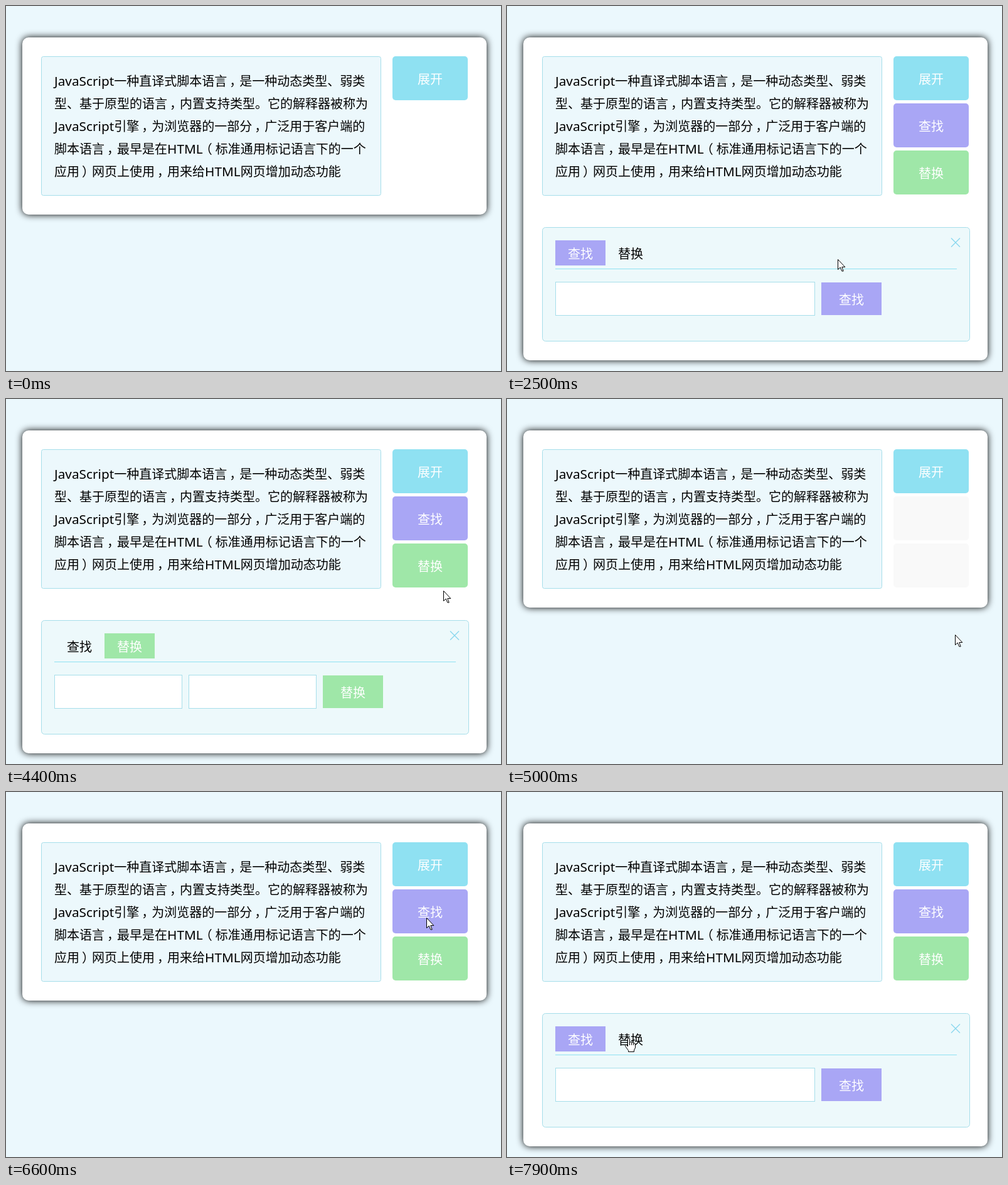
An HTML page that plays this animation: 789x581 px, repeating every 8 s.

```html
<!DOCTYPE html>
<html lang="zh-CN">
<head>
<meta charset="utf-8">
<title>展开 查找 替换</title>
<style>
  html, body { margin: 0; width: 100%; height: 100%; overflow: hidden; background: #ebf8fd; }
  #card { position: absolute; left: 26px; top: 50px; width: 740px;
    border-radius: 10px; background: #fff; box-shadow: 0 0 12px #000; }
  svg { position: absolute; left: 0; top: 0; }
  text { font: 20px "Noto Sans CJK SC", "Noto Sans CJK", "Noto Sans CJK JP", sans-serif; white-space: pre; }
  .latin { font: 20.8px "Noto Sans", "Open Sans", sans-serif; }
</style>
</head>
<body>
<div id="card"></div>
<svg id="stage" width="789" height="581" viewBox="0 0 789 581"></svg>
<script>
const NS = 'http://www.w3.org/2000/svg';
const BLUE = '#8fe1f2', PURPLE = '#a9a6f5', GREEN = '#9fe7a8', EDGE = '#a6deea';
const FIND = '查找', REPLACE = '替换';
const LOOP = 8000, STEP = 100;
const stage = document.getElementById('stage');
const card = document.getElementById('card');

function add(parent, tag, attrs = {}) {
  const el = document.createElementNS(NS, tag);
  for (const k in attrs) el.setAttribute(k, attrs[k]);
  parent.appendChild(el);
  return el;
}
const group = parent => add(parent, 'g');
const show = (el, on) => el.setAttribute('display', on ? 'inline' : 'none');
const fillBox = (parent, x, y, width, height, fill, rx = 0) =>
  add(parent, 'rect', { x, y, width, height, fill, rx });
const edgeBox = (parent, x, y, w, h, fill, rx = 0) =>
  add(parent, 'rect', { x: x + .5, y: y + .5, width: w - 1, height: h - 1, fill, rx, stroke: EDGE });

// a label without a fill colour is a plain black one
function button(parent, x, y, w, h, fill, str, rx = 0) {
  if (fill) fillBox(parent, x, y, w, h, fill, rx);
  add(parent, 'text', { x: x + w / 2, y: y + h / 2 + 8.5, fill: fill ? '#fff' : '#000',
    'text-anchor': 'middle' }).textContent = str;
}

// punctuation sits nearer the middle of its cell than the font has it
const NUDGE = { '，': 4, '（': -5, '）': 4 };
function paragraph(x, y, lines) {
  lines.forEach((line, i) => {
    const text = add(stage, 'text', { x, y: y + 36 * i });
    let back = 0;
    for (const run of line.match(/[A-Za-z]+|[，（）]|[^A-Za-z，（）]+/g)) {
      const shift = NUDGE[run] || 0;
      const span = add(text, 'tspan', { dx: shift - back });
      if (/[A-Z]/.test(run)) span.setAttribute('class', 'latin');
      span.textContent = run;
      back = shift;
    }
  });
}

edgeBox(stage, 56, 80, 542, 222, '#ecf8fc', 3);
paragraph(77, 127, [
  'JavaScript一种直译式脚本语言，是一种动态类型、弱类',
  '型、基于原型的语言，内置支持类型。它的解释器被称为',
  'JavaScript引擎，为浏览器的一部分，广泛用于客户端的',
  '脚本语言，最早是在HTML（标准通用标记语言下的一个',
  '应用）网页上使用，用来给HTML网页增加动态功能'
]);

// side buttons
button(stage, 616, 80, 120, 70, BLUE, '展开', 5);
const fading = group(stage), menu = group(stage);
[[FIND, PURPLE], [REPLACE, GREEN]].forEach(([str, color], i) => {
  const y = 155 + 75 * i;
  fillBox(fading, 616, y, 120, 70, '#f9f9f9', 5);
  button(menu, 616, y, 120, 70, color, str, 5);
});

// dialog with one page per tab
const dialog = group(stage);
edgeBox(dialog, 56, 352, 682, 182, '#edf9fb', 5);
fillBox(dialog, 77, 418, 640, 1, BLUE);
add(dialog, 'path', { d: 'M708 369.5l14 14m0-14l-14 14', stroke: '#8bd8ee', 'stroke-width': 1.4 });

function page(name, color, fields, fieldWidth) {
  const g = group(dialog);
  [FIND, REPLACE].forEach((tab, i) =>
    button(g, 77 + 80 * i, 373, 80, 40, tab === name && color, tab));
  for (let i = 0; i < fields; i++)
    edgeBox(g, 77 + i * (fieldWidth + 10), 439, fieldWidth, 54, '#fff');
  button(g, 77 + fields * (fieldWidth + 10), 440, 96, 52, color, name);
  return g;
}
const findPage = page(FIND, PURPLE, 1, 414);
const replacePage = page(REPLACE, GREEN, 2, 204);

// pointers, both with the hot spot at 0,0
const pointer = { fill: '#fff', stroke: '#000', 'stroke-linejoin': 'round' };
const arrow = add(stage, 'path', { ...pointer,
  d: 'M.5.5V16.5L4.2 13L6.8 19H9.2L6.8 12.5H11.8Z' });
const hand = group(stage);
add(hand, 'path', { ...pointer,
  d: 'M-1.5 14V2Q-1.5.5 0 .5T1.5 2V8Q4 5 5 8Q7 6 8 9Q10 8 10.5 10V16L8.5 20V22.5H-.5V20.5L-5.3 13.8Q-6 11-4 11Z' });
add(hand, 'path', { d: 'M1.5 8V12M4.7 8V12M7.8 9V12', stroke: '#000' });

// what each click leaves on screen
const clicks = [
  [0, 'closed'], [700, 'menu'], [1800, 'find'], [3100, 'replace'], [3700, 'find'],
  [4100, 'replace'], [5000, 'closed'], [5900, 'menu'], [6700, 'find'], [7200, 'replace'], [7900, 'find']
];
// pointer moves: leave, arrive, x, y; it rests in between
const moves = [
  [0, 200, 720, 41], [200, 500, 665, 107], [1100, 1500, 665, 180], [1800, 2200, 203, 411],
  [2200, 2500, 527, 403], [2500, 2700, 705, 345], [2700, 2800, 698, 264], [3400, 3600, 674, 195],
  [3700, 3900, 685, 258], [4200, 4700, 714, 375], [5000, 5600, 688, 121], [6100, 6600, 670, 200],
  [6700, 6900, 194, 391], [7400, 7600, 122, 391], [7700, 7800, 194, 391]
];

function pointerAt(t) {
  const i = moves.findLastIndex(m => m[0] <= t);
  const [leave, arrive, x, y] = moves[i];
  const [, , x0, y0] = moves[Math.max(0, i - 1)];
  const k = Math.min(1, (t - leave) / (arrive - leave));
  return { x: Math.round(x0 + (x - x0) * k), y: Math.round(y0 + (y - y0) * k), resting: t > arrive };
}

function clickable(x, y, state, open) {
  const inside = (left, top, w, h) => x >= left && x < left + w && y >= top && y < top + h;
  return inside(616, 80, 120, state === 'closed' ? 70 : 220) ||
    open && (inside(77, 373, 160, 40) || inside(706, 367, 18, 18));
}

function render(time) {
  const t = Math.floor(time % LOOP / STEP) * STEP;
  const [since, state] = clicks.findLast(c => c[0] <= t);
  const open = state === 'find' || state === 'replace';
  card.style.height = (open ? 514 : 282) + 'px';
  show(menu, state !== 'closed');
  show(fading, state === 'closed' && since > 0 && t < since + STEP);
  show(dialog, open);
  show(findPage, state === 'find');
  show(replacePage, state === 'replace');

  const { x, y, resting } = pointerAt(t);
  const pointing = resting && clickable(x, y, state, open);
  for (const [el, on] of [[arrow, !pointing], [hand, pointing]]) {
    show(el, on && t >= 200);
    el.setAttribute('transform', `translate(${x} ${y})`);
  }
}

const start = performance.now();
function tick() {
  render(performance.now() - start);
  requestAnimationFrame(tick);
}
tick();
</script>
</body>
</html>
```
